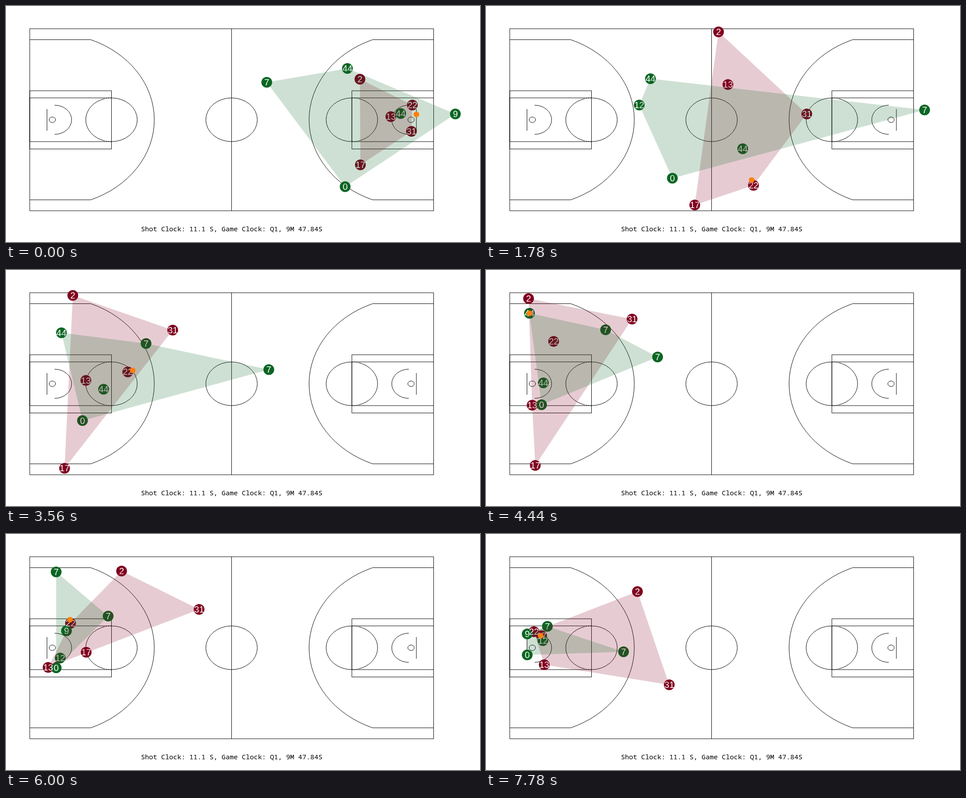
An HTML page for the animation above (8 s loop, 1058 px wide and 529 px high).

```html
<!DOCTYPE html>
<html lang="en">
<head>
<meta charset="utf-8">
<title>Basketball play</title>
<style>
  html, body { margin: 0; width: 100%; height: 100%; overflow: hidden; background: #fff; }
  svg { display: block; width: 100vw; height: 100vh; }
  #court { fill: none; stroke: #000; stroke-width: 1; }
  #labels { font: 20px "Liberation Sans", Arial, sans-serif; fill: #fff; text-anchor: middle; }
  #clock { font: 15px "Noto Sans Mono", "DejaVu Sans Mono", monospace; text-anchor: middle; }
</style>
</head>
<body>
<svg viewBox="0 0 1058 529">
  <g id="court">
    <rect x="53" y="51" width="901.5" height="408"/>
    <path d="M503.5 51V459"/>
    <ellipse cx="503.5" cy="255" rx="57.5" ry="49"/>
    <g id="half">
      <path d="M53 75.5H189.2A227.6 193.8 0 0 1 189.2 434.5H53"/>
      <rect x="53" y="190" width="182.5" height="130.5"/>
      <rect x="53" y="206" width="182.5" height="98"/>
      <path d="M235.5 206A57.5 49 0 0 1 235.5 304"/>
      <path d="M235.5 206A57.5 49 0 0 0 235.5 304" pathLength="167"
        stroke-dasharray="3 2 3 2 3 2 137 2 3 2 3 2 3"/>
      <path d="M91.5 231V279.5M108.5 222.3A38 32.7 0 0 1 108.5 287.7"/>
      <ellipse cx="103.4" cy="255" rx="7.2" ry="6.2"/>
    </g>
    <use href="#half" transform="translate(1007.5 0) scale(-1 1)"/>
  </g>
  <g id="dots"></g>
  <g id="labels"></g>
  <g id="hulls" fill-opacity=".2"></g>
  <circle id="ball" r="6.3" fill="#ff7f0e"/>
  <text id="clock" x="503.8" y="505">Shot Clock: 11.1 S, Game Clock: Q1, 9M 47.84S</text>
</svg>
<script>
const LOOP = 8000, STEPS = 36;
const KEYS = [0, 4, 8, 12, 20, 27, 35];
const RED = '#800020', GREEN = '#0b6623';
const $ = id => document.getElementById(id);

function add(parent, tag, attrs = {}) {
  const el = document.createElementNS('http://www.w3.org/2000/svg', tag);
  for (const name in attrs) el.setAttribute(name, attrs[name]);
  return $(parent).appendChild(el);
}

// Waypoints at the common keys plus optional extra [step, x, y] points.
function track(xs, ys, ...extra) {
  return KEYS.map((k, i) => [k, xs[i], ys[i]]).concat(extra).sort((a, b) => a[0] - b[0]);
}

function slope(pts, i, axis) {
  const a = pts[Math.max(i - 1, 0)], b = pts[Math.min(i + 1, pts.length - 1)];
  return (b[axis] - a[axis]) / (b[0] - a[0]);
}

// Smooth cubic through the waypoints.
function position(pts, step) {
  let i = 0;
  while (i < pts.length - 2 && step >= pts[i + 1][0]) i++;
  const a = pts[i], b = pts[i + 1], span = b[0] - a[0], u = (step - a[0]) / span;
  const ease = u * u * (3 - 2 * u);
  return [1, 2].map(axis => a[axis] + (b[axis] - a[axis]) * ease
    + span * u * (1 - u) * ((1 - u) * slope(pts, i, axis) - u * slope(pts, i + 1, axis)));
}

function convexHull(points) {
  const sorted = [...points].sort((a, b) => a[0] - b[0] || a[1] - b[1]);
  const chain = list => {
    const out = [];
    for (const p of list) {
      while (out.length > 1) {
        const [a, b] = out.slice(-2);
        if ((b[0] - a[0]) * (p[1] - a[1]) > (b[1] - a[1]) * (p[0] - a[0])) break;
        out.pop();
      }
      out.push(p);
    }
    return out.slice(0, -1);
  };
  return [...chain(sorted), ...chain(sorted.reverse())];
}

const players = [];
function player(color, numbers, path) {
  players.push({
    color, path, numbers: [].concat(numbers),
    dot: add('dots', 'circle', { r: 12, fill: color }),
    label: add('labels', 'text')
  });
}

player(RED, 2, track([790, 726, 519, 272, 95, 258, 338], [164, 108, 58, 53, 64, 83, 129]));
player(RED, 13, track([859, 764, 540, 299, 103, 94, 130], [248, 212, 176, 186, 303, 299, 293]));
player(RED, 17, track([791, 686, 466, 238, 110, 179, 124], [356, 400, 446, 455, 438, 265, 228],
  [15, 145, 444]));
player(RED, 22, track([907, 845, 597, 429, 151, 144, 107], [222, 344, 402, 321, 160, 200, 219]));
player(RED, 31, track([905, 869, 716, 477, 326, 431, 409], [281, 291, 242, 180, 110, 169, 338]));

player(GREEN, [7, 9, 12, 12, 7, 9, 9],
  track([582, 455, 342, 343, 267, 135, 92], [171, 199, 222, 211, 134, 217, 224], [5, 420, 206]));
player(GREEN, [44, 7, 44, 44, 44, 7, 7],
  track([762, 572, 367, 213, 97, 112, 137], [140, 171, 163, 177, 97, 85, 207],
    [10, 282, 168], [15, 136, 151], [24, 76, 53], [25, 81, 55]));
player(GREEN, [9, 7, 7, 7, 7, 7, 7],
  track([1003, 1003, 979, 797, 383, 228, 307], [242, 237, 233, 242, 195, 184, 264],
    [2, 1007, 240], [10, 893, 236], [15, 641, 230]));
player(GREEN, [44, 12, 44, 44, 44, 12, 12],
  track([881, 807, 573, 351, 128, 121, 127], [241, 265, 320, 291, 253, 278, 239]));
player(GREEN, 0, track([757, 603, 416, 248, 124, 112, 92], [405, 379, 386, 377, 302, 300, 271],
  [31, 87, 287]));

const ballPath = track([916, 850, 593, 429, 97, 143, 122], [243, 353, 390, 306, 97, 192, 228],
  [18, 205, 178], [22, 100, 72]);

const hulls = [RED, GREEN].map(color => ({ color, shape: add('hulls', 'polygon', { fill: color }) }));

function numberAt(numbers, step) {
  if (numbers.length === 1) return numbers[0];
  let i = 0;
  while (i < KEYS.length - 1 && step >= (KEYS[i] + KEYS[i + 1]) / 2) i++;
  return numbers[i];
}

function place(el, x, y, names) {
  el.setAttribute(names[0], x.toFixed(1));
  el.setAttribute(names[1], y.toFixed(1));
}

function render(time) {
  const step = Math.floor((time % LOOP + 5) * STEPS / LOOP) % STEPS;
  for (const p of players) {
    p.at = position(p.path, step);
    place(p.dot, ...p.at, ['cx', 'cy']);
    place(p.label, p.at[0], p.at[1] + 7, ['x', 'y']);
    p.label.textContent = numberAt(p.numbers, step);
  }
  for (const { color, shape } of hulls) {
    const team = players.filter(p => p.color === color).map(p => p.at);
    shape.setAttribute('points', convexHull(team).join(' '));
  }
  place($('ball'), ...position(ballPath, step), ['cx', 'cy']);
}

const start = performance.now();
function tick() {
  render(performance.now() - start);
  requestAnimationFrame(tick);
}
tick();
</script>
</body>
</html>
```
